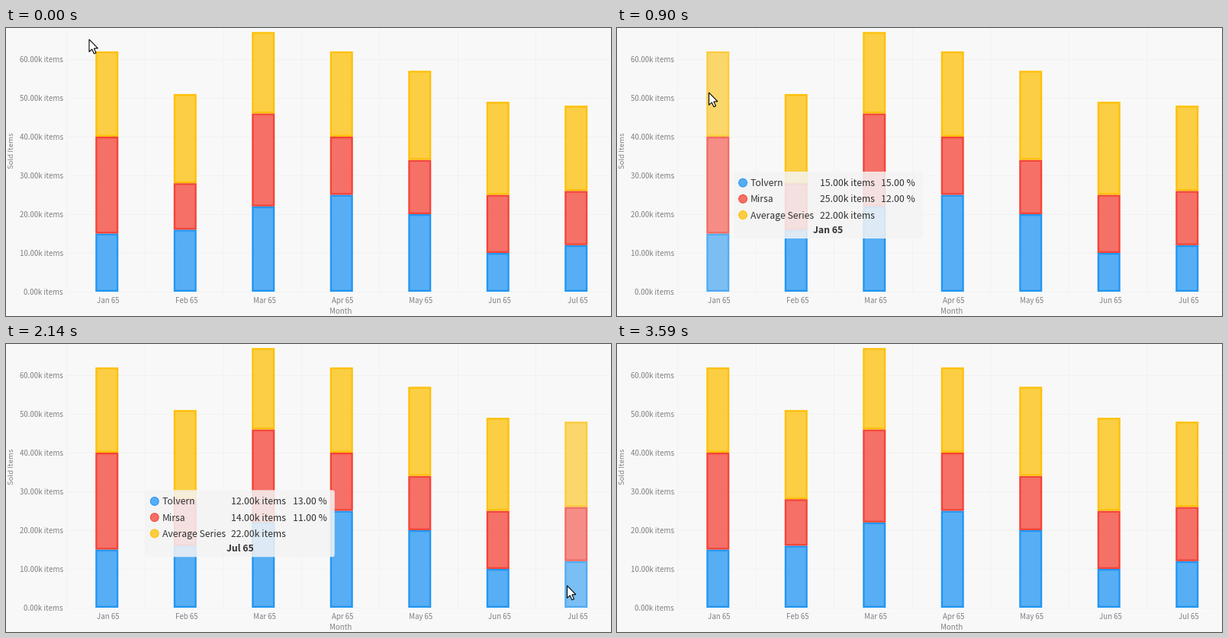
A matplotlib script that plays this animation: 793 by 379 pixels, repeating every 4.59 s.

```python
import numpy as np
import matplotlib.pyplot as plt
from matplotlib.animation import FuncAnimation
from matplotlib.patches import Circle, FancyBboxPatch, Polygon, Rectangle
from matplotlib.transforms import Affine2D

W, H, DPI = 793, 379, 64
LOOP, STEP = 4590, 30
BG, GREY, INK = "#f8f8f8", "#828282", "#333333"
COLORS = ("#2196f3", "#f44336", "#fec007")

MONTHS = [f"{m} 65" for m in "Jan Feb Mar Apr May Jun Jul".split()]
SOLD = [(15, 25, 22), (16, 12, 23), (22, 24, 21), (25, 15, 22),
        (20, 14, 23), (10, 15, 24), (12, 14, 22)]
NAMES = ["Tolvern", "Mirsa", "Average Series"]
SHARES = {"Jan 65": (15, 12), "Jul 65": (13, 11)}

BASE, UNIT = 347, 5.1                  # y of zero, pixels per thousand items
LEFT, PITCH, BAR = 80, 102.5, 30       # plot edge, month spacing, bar width
STROKE = 2.3
TIP_ON, TIP_SWITCH, TIP_OFF = 430, 2110, 3585

plt.rcParams["font.family"] = ["Noto Sans CJK JP", "DejaVu Sans"]
fig = plt.figure(figsize=(W / DPI, H / DPI), dpi=DPI, facecolor=BG)
ax = fig.add_axes([0, 0, 1, 1])
ax.set(xlim=(0, W), ylim=(H, 0))
ax.axis("off")


def pt(px):
    return px * 72 / DPI


def glide(t, start, end, a, b, power=1):
    """Point on the way from a to b between two times."""
    p = np.clip((t - start) / (end - start), 0, 1) ** power
    return np.array(a) + (np.array(b) - a) * p


def label(x, y, s, size=9.7, color=GREY, **kw):
    """Text whose digits are centred on y."""
    return ax.text(x, y + 0.365 * size, s, fontsize=pt(size), color=color,
                   va="baseline", **kw)


def bar_x(i):
    return LEFT + PITCH * (i + 0.5) + 1 - BAR / 2


def draw_axes():
    grid = dict(color="#f2f2f2", lw=pt(1), zorder=0)
    for k in range(7):
        y = BASE - 10 * k * UNIT
        ax.plot([LEFT, W], [y, y], **grid)
        label(75, y, f"{10 * k}.00k items", ha="right")
    for i, month in enumerate(MONTHS):
        x = LEFT + PITCH * i
        ax.plot([x - 0.6] * 2, [0, BASE], **grid)
        label(x + 54, 358.5, month, ha="center")
    label(438.5, 372.5, "Month", ha="center")
    ax.text(7.5, 161, "Sold Items", fontsize=pt(9.6), color=GREY,
            rotation=90, ha="center", va="center")


def draw_bars():
    for i, parts in enumerate(SOLD):
        bottom = BASE
        for value, color in zip(parts, COLORS):
            height = value * UNIT
            bottom -= height
            ax.add_patch(Rectangle(
                (bar_x(i) + STROKE / 2, bottom + STROKE / 2),
                BAR - STROKE, height - STROKE,
                fc=(color, 0.75), ec=color, lw=pt(STROKE),
                joinstyle="miter", snap=False, zorder=2))


def make_tip():
    shift = Affine2D()
    box = FancyBboxPatch((0, 0), 248, 88, fc="#f4f4f4", ec="none", alpha=0.86,
                         boxstyle="round,pad=0,rounding_size=3", zorder=4)
    parts = [ax.add_patch(box)]
    rows = []
    ink = dict(size=12.2, color=INK, zorder=5)
    for k, (name, color) in enumerate(zip(NAMES, COLORS)):
        y = 14.7 + 21.2 * k
        dot = Circle((12, y), 5.4, fc=(color, 0.75), ec=color, lw=pt(1),
                     zorder=5)
        parts += [ax.add_patch(dot), label(22, y, name, **ink)]
        rows.append((label(112.5, y, "", **ink), label(193.5, y, "", **ink)))
    title = label(124, 76.5, "", ha="center", weight="bold", **ink)
    parts += [text for row in rows for text in row] + [title]
    for part in parts:
        part.set_transform(shift + ax.transData)
    return shift, parts, rows, title


def make_cursor():
    shift = Affine2D()
    shape = [(0, 0), (0, 16.4), (3.7, 12.9), (6.4, 18.8), (9, 17.7),
             (6.4, 11.9), (11.4, 11.7)]
    arrow = Polygon(shape, fc="white", ec="black", lw=pt(1.1),
                    joinstyle="miter", zorder=9)
    ax.add_patch(arrow).set_transform(shift + ax.transData)
    return shift


draw_axes()
draw_bars()
veil = ax.add_patch(Rectangle((0, 0), BAR + 2, 0, fc=BG, ec="none",
                              alpha=0.22, zorder=3))
tip_shift, tip_parts, tip_rows, tip_title = make_tip()
cursor_shift = make_cursor()


def cursor_at(t):
    first, last = (120.5, 85), (753.5, 325)
    if t < 930:
        return glide(t, 30, 480, (109, 15), first)
    if t < 1740:
        return glide(t, 930, 1120, first, (215, 385))
    turn = (735.5, 318)
    if t < 2180:
        return glide(t, 1760, 2140, (764.5, 366.5), turn, power=3)
    if t < 2530:
        return glide(t, 2180, 2290, turn, last)
    return glide(t, 2530, 2900, last, (768, 385))


def tip_at(t):
    rest = (153, 189)
    if t < TIP_SWITCH:
        return glide(t, 500, 630, (419, 218), rest)
    return glide(t, 2130, 2350, rest, (480, 225))


def hovered(x, y):
    for i, parts in enumerate(SOLD):
        inside = bar_x(i) <= x <= bar_x(i) + BAR
        if inside and BASE - sum(parts) * UNIT <= y <= BASE:
            return i
    return None


def fill_tip(i):
    tip_title.set_text(MONTHS[i])
    for (amount, _), value in zip(tip_rows, SOLD[i]):
        amount.set_text(f"{value}.00k items")
    for (_, share), value in zip(tip_rows, SHARES[MONTHS[i]]):
        share.set_text(f"{value}.00 %")


def update(n):
    t = n * STEP + 20
    x, y = cursor_at(t)
    cursor_shift.clear().translate(x, y)

    bar = hovered(x, y)
    veil.set_visible(bar is not None)
    if bar is not None:
        height = sum(SOLD[bar]) * UNIT + 2
        veil.set_xy((bar_x(bar) - 1, BASE + 1 - height))
        veil.set_height(height)

    for part in tip_parts:
        part.set_visible(TIP_ON <= t < TIP_OFF)
    fill_tip(0 if t < TIP_SWITCH else -1)
    tip_shift.clear().translate(*tip_at(t))
    return []


anim = FuncAnimation(fig, update, frames=LOOP // STEP, interval=STEP,
                     repeat=True, repeat_delay=0, blit=False)
plt.show()
```
